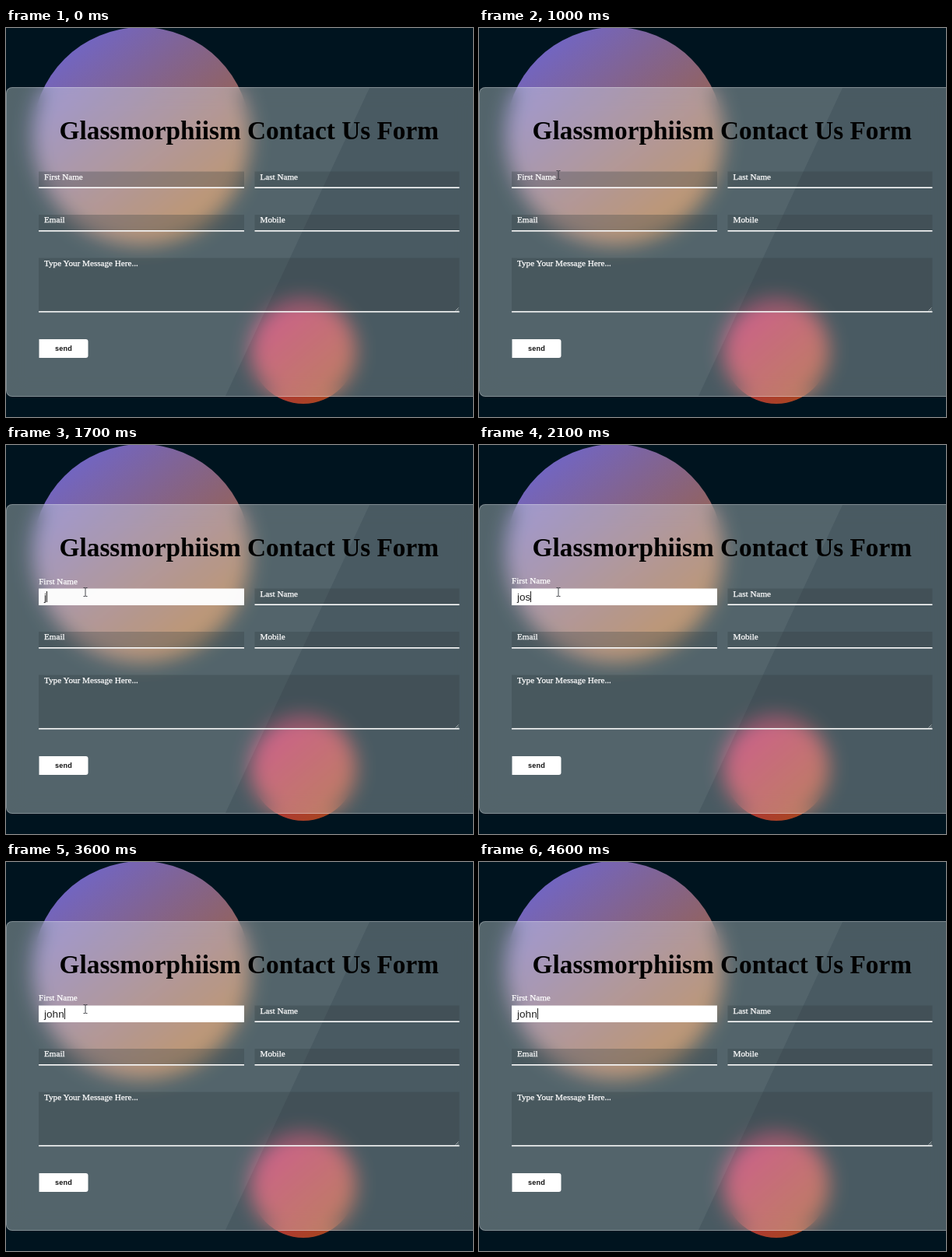
Recreate the animation shown at these times as an HTML page. Size 600x500 px, loop 5000 ms.

```html
<!DOCTYPE html>
<html lang="en">
<head>
<meta charset="utf-8">
<title>Glass contact form</title>
<style>
  html, body { margin: 0; width: 100%; height: 100%; overflow: hidden; background: #00141f; }
  #stage { position: relative; width: 600px; height: 500px; overflow: hidden; background: #00141f; }
  .ball { position: absolute; border-radius: 50%; }
  .big { left: 34px; top: -1px; width: 280px; height: 280px; background: linear-gradient(142deg, #6866e0, #b06004); }
  .small { left: 314px; top: 347px; width: 136px; height: 136px; background: linear-gradient(140deg, #c01662, #a44e16); }
  .glass {
    position: absolute; left: 0; top: 76px; width: 620px; height: 398px; box-sizing: border-box;
    border: 1px solid rgba(255, 255, 255, .3); border-radius: 8px;
    background: rgba(240, 255, 255, .3);
    -webkit-backdrop-filter: blur(13px); backdrop-filter: blur(13px);
  }
  svg { position: absolute; left: 0; top: 0; }
  .title { font: bold 33.3px "Liberation Serif", serif; }
  .label { font: 11.15px "Liberation Serif", serif; fill: #fff; stroke: #fff; stroke-width: .25px; }
  .field { fill: rgba(52, 62, 65, .3); }
  .line { fill: #fff; }
  .typed { font: 13.6px "Liberation Sans", sans-serif; fill: #222; }
  .send { font: bold 9.1px "Liberation Sans", sans-serif; letter-spacing: .2px; fill: #111; }
</style>
</head>
<body>
<div id="stage">
  <div class="ball big"></div>
  <div class="ball small"></div>
  <div class="glass"></div>
  <svg width="600" height="500" viewBox="0 0 600 500">
    <path d="M8 77H467L282 473H8Q1 473 1 466V84Q1 77 8 77Z" fill="#f0ffff" fill-opacity=".064"/>
    <text class="title" x="68.6" y="143">Glassmorphiism Contact Us Form</text>
    <g id="fields"></g>
    <path d="M577.5 363.5l4-4M580 363.5l1.5-1.5" stroke="#cfd4d6" stroke-width=".7"/>
    <path d="M42.5 400H102.5Q105.5 400 105.5 403V421Q105.5 424 102.5 424H42.5Z" fill="#fff"/>
    <text class="send" x="74" y="415.3" text-anchor="middle">send</text>
    <text class="typed" id="typed" x="49" y="199.6"></text>
    <rect id="caret" y="188" width="1" height="14" fill="#222"/>
    <path id="beam" d="M-2.5 -5.5H-.8L0 -4.8L.8 -5.5H2.5M0 -4.8V4.8M-2.5 5.5H-.8L0 4.8L.8 5.5H2.5" fill="none" stroke="#33343a" stroke-width=".9"/>
    <path id="arrow" d="M0 0V10.5L2.4 8.3L4 12L5.8 11.2L4.2 7.7H7.3Z" fill="#fff" stroke="#222" stroke-width=".7"/>
  </svg>
</div>
<script>
  const LOOP = 5000, STEP = 100;
  const $ = id => document.getElementById(id);
  const add = (name, attrs, text = '') => {
    const el = document.createElementNS('http://www.w3.org/2000/svg', name);
    for (const key in attrs) el.setAttribute(key, attrs[key]);
    el.textContent = text;
    return $('fields').appendChild(el);
  };

  // label, x, y, width, height
  const rows = [
    ['First Name', 42, 184.5, 264, 21.5],
    ['Last Name', 319.5, 184.5, 263, 21.5],
    ['Email', 42, 240, 264, 21.6],
    ['Mobile', 319.5, 240, 263, 21.6],
    ['Type Your Message Here...', 42, 295.5, 540.5, 70]
  ];
  const [first] = rows.map(([name, x, y, width, height]) => {
    const box = add('rect', { class: 'field', x, y, width, height });
    add('rect', { class: 'line', x, y: y + height - 1.6, width, height: 1.6 });
    return { box, label: add('text', { class: 'label', x: x + 7, y: y + 10 }, name) };
  });

  const typing = [[0, ''], [1700, 'j'], [1900, 'jo'], [2100, 'jos'], [2500, 'jo'],
                  [2900, 'joh'], [3100, 'johs'], [3400, 'joh'], [3600, 'john']];
  const caretSwitches = [[0, false], [1300, true], [4000, false], [4500, true]];
  // time, x, y; the pointer is hidden where x is null
  const pointer = [[0, null], [100, 560, 330], [200, 410, 275], [300, 275, 235], [400, 180, 210],
                   [500, 125, 196], [600, 104, 191], [1000, 102, 189], [4000, 352.5, 210],
                   [4100, 545, 262], [4200, null]];

  const at = (table, t) => table.filter(row => row[0] <= t).pop();
  const mix = (a, b, p) => a + (b - a) * p;
  const clamp = v => Math.min(1, Math.max(0, v));

  // CSS "ease" timing curve
  function ease(x) {
    if (x === 0 || x === 1) return x;
    let lo = 0, hi = 1, u = .5;
    for (let i = 0; i < 20; i++) {
      u = (lo + hi) / 2;
      const bx = 3 * (1 - u) ** 2 * u * .25 + 3 * (1 - u) * u * u * .25 + u ** 3;
      if (bx < x) lo = u; else hi = u;
    }
    return 3 * (1 - u) ** 2 * u * .1 + 3 * (1 - u) * u * u + u ** 3;
  }

  const show = (el, on) => el.setAttribute('visibility', on ? 'visible' : 'hidden');
  const overField = (px, py) => rows.some(([, x, y, w, h]) => px >= x && px <= x + w && py >= y && py <= y + h);

  function render(t) {
    const rise = ease(clamp((t - 1290) / 500));
    first.label.setAttribute('x', mix(49, 42, rise));
    first.label.setAttribute('y', mix(194.5, 178.4, rise));

    // the fill trails the label; channels are mixed premultiplied
    const fade = rise ** 1.4;
    const alpha = mix(.3, 1, fade);
    const [r, g, b] = [52, 62, 65].map(c => Math.round(mix(c * .3, 255, fade) / alpha));
    first.box.style.fill = `rgba(${r}, ${g}, ${b}, ${alpha})`;

    $('typed').textContent = at(typing, t)[1];
    const width = $('typed').textContent ? $('typed').getComputedTextLength() : 0;
    $('caret').setAttribute('x', Math.round(49 + width));
    show($('caret'), at(caretSwitches, t)[1]);

    const [, x, y] = at(pointer, t);
    const visible = x !== null;
    const isBeam = visible && overField(x, y);
    show($('beam'), isBeam);
    show($('arrow'), visible && !isBeam);
    if (visible) $(isBeam ? 'beam' : 'arrow').setAttribute('transform', `translate(${x} ${y})`);
  }

  const start = performance.now();
  function tick() {
    const t = (performance.now() - start) % LOOP;
    render(Math.floor(t / STEP) * STEP);
    requestAnimationFrame(tick);
  }
  tick();
</script>
</body>
</html>
```
